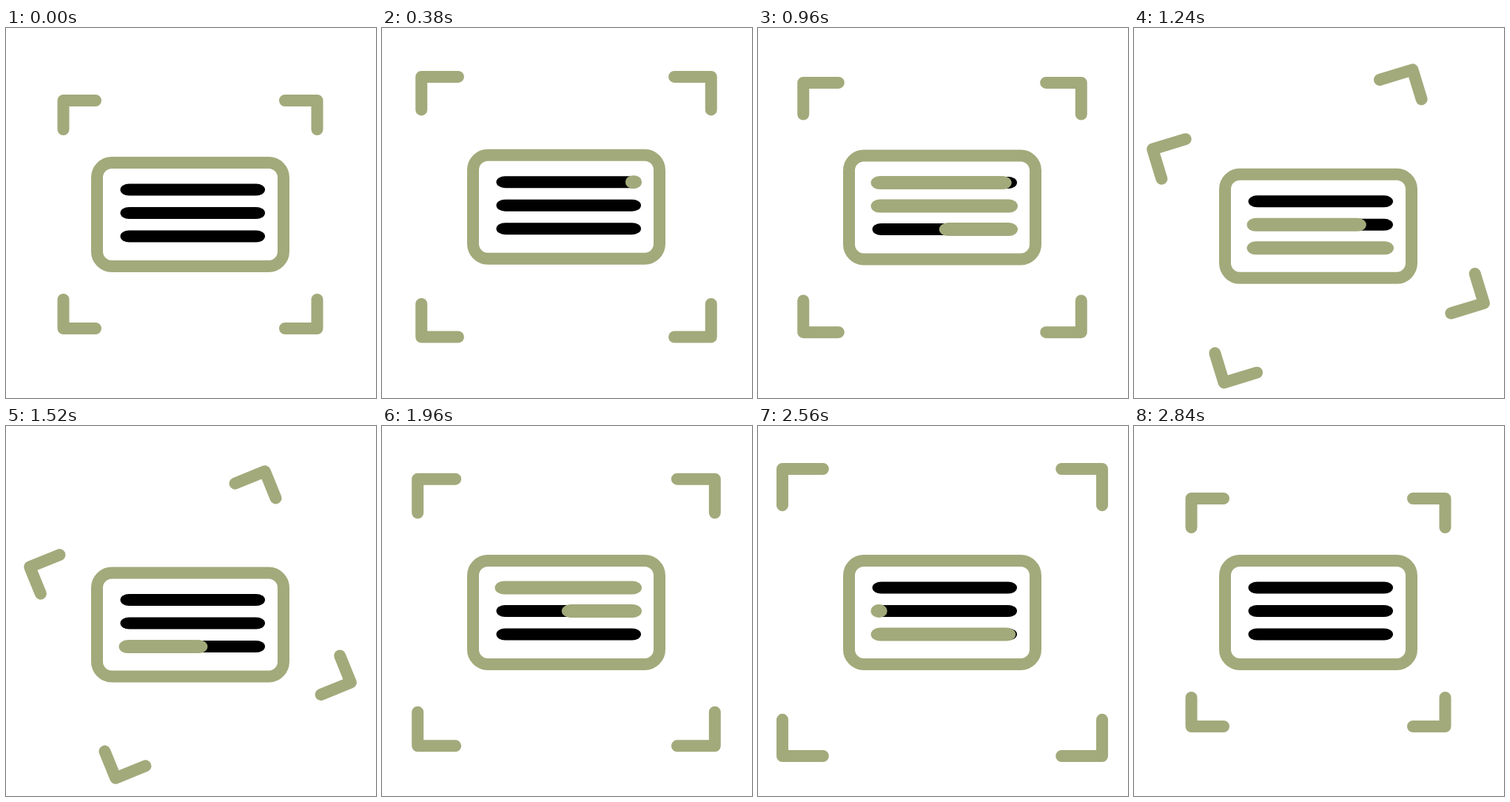
Animation of 500 by 500 pixels, one loop 3000 ms. Source, as an HTML page with a canvas:

```html
<!DOCTYPE html>
<html lang="en">
<head>
<meta charset="utf-8">
<title>Scan</title>
<style>
  html, body { margin: 0; width: 100%; height: 100%; overflow: hidden; background: #fff; }
  canvas { display: block; width: 500px; height: 500px; }
</style>
</head>
<body>
<canvas id="stage" width="500" height="500"></canvas>
<script>
const ctx = document.getElementById('stage').getContext('2d');
const LOOP = 3000;
const OLIVE = '#a2aa7b';

// Tracks are [time in ms, value] pairs.
const SHIFT = [[180, 0], [680, -29], [1308, 17.3], [1480, 17.3], [1800, 0]];
const SCALE = [
  [180, 1], [455, 1.172], [747, 0.88], [1094, 1.2], [1340, 1],
  [1700, 1], [1975, 1.172], [2275, 0.88], [2555, 1.26], [2840, 1]
];
const TILT = [[1120, 0], [1370, -35.7], [1730, 0]];

const SWEEP = 300;
const ROWS = [
  { y: 218.5, sweeps: [[344, 924], [1530, 2089]] },
  { y: 250, sweeps: [[574, 1158], [1802, 2315]] },
  { y: 281.5, sweeps: [[804, 1392], [2062, 2540]] }
];

const smooth = u => {
  u = Math.min(1, Math.max(0, u));
  return u * u * (3 - 2 * u);
};

function valueAt(track, t) {
  if (t <= track[0][0]) return track[0][1];
  for (let i = 1; i < track.length; i++) {
    const [t0, v0] = track[i - 1], [t1, v1] = track[i];
    if (t < t1) return v0 + (v1 - v0) * smooth((t - t0) / (t1 - t0));
  }
  return track[track.length - 1][1];
}

function pill(left, right, y, height, color) {
  ctx.fillStyle = color;
  ctx.beginPath();
  ctx.roundRect(left, y - height / 2, right - left, height, { x: 12, y: height / 2 });
  ctx.fill();
}

function drawCorners(scale, tilt) {
  const w = 171.5 * scale, h = 154 * scale;
  const armX = 43.5 * scale, armY = 39 * scale;
  ctx.save();
  ctx.translate(249, 252);
  ctx.rotate(tilt * Math.PI / 180);
  ctx.beginPath();
  for (const sx of [-1, 1]) {
    for (const sy of [-1, 1]) {
      ctx.moveTo(sx * (w - armX), sy * h);
      ctx.lineTo(sx * w, sy * h);
      ctx.lineTo(sx * w, sy * (h - armY));
    }
  }
  ctx.stroke();
  ctx.restore();
}

function drawRow({ y, sweeps }, t) {
  const left = 152.5, right = 351, cap = 22;
  pill(154.5, 350, y, 16, '#000');
  for (const [enter, leave] of sweeps) {
    if (t <= enter || t >= leave + SWEEP) continue;
    const filled = smooth((t - enter) / SWEEP);
    const cleared = smooth((t - leave) / SWEEP);
    const start = Math.min(right - cap, right - (right - left) * filled);
    const end = Math.max(left + cap, right - (right - left) * cleared);
    pill(start, end, y, 18, OLIVE);
  }
}

function draw(t) {
  ctx.fillStyle = '#fff';
  ctx.fillRect(0, 0, 500, 500);
  ctx.save();
  ctx.translate(0, valueAt(SHIFT, t));
  ctx.strokeStyle = OLIVE;
  ctx.lineWidth = 16;
  ctx.lineCap = ctx.lineJoin = 'round';
  drawCorners(valueAt(SCALE, t), valueAt(TILT, t));
  ctx.beginPath();
  ctx.roundRect(123, 182, 252, 140, 20);
  ctx.stroke();
  ROWS.forEach(row => drawRow(row, t));
  ctx.restore();
}

const began = performance.now();
function tick() {
  draw((performance.now() - began) % LOOP);
  requestAnimationFrame(tick);
}
tick();
</script>
</body>
</html>
```
